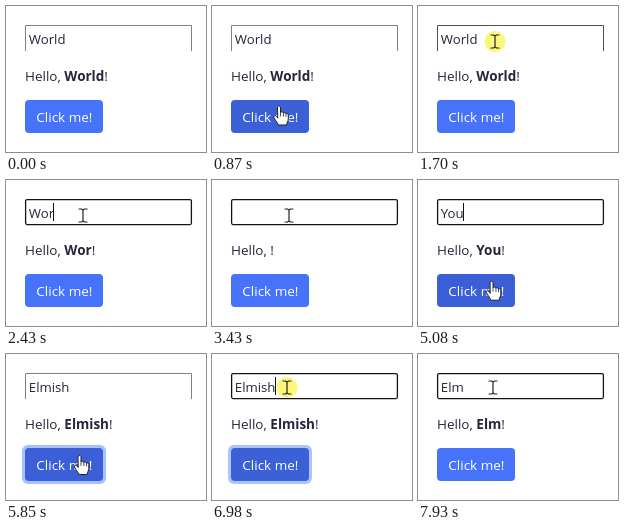
Recreate the animation shown at these times as an HTML page. Size 200 px wide and 146 px high, loop 8 s.

```html
<!DOCTYPE html>
<html lang="en">
<head>
<meta charset="utf-8">
<title>Greeting form</title>
<style>
  html, body { margin: 0; width: 100%; height: 100%; overflow: hidden; background: #fff; }
  svg { display: block; width: 200px; height: 146px; }
  text { font: 13.5px "Open Sans", "Noto Sans", sans-serif; fill: #25263a; white-space: pre; }
  #value { font-size: 13.2px; }
  .bold { font-weight: 700; }
  .label { fill: #fff; }
  .cursor { stroke: #222; stroke-linejoin: round; stroke-linecap: round; }
</style>
</head>
<body>
<svg viewBox="0 0 200 146">
  <path id="plain" d="M19.5 45V19.5H185.5V45" fill="none"/>
  <rect id="focus" x="19.6" y="19.6" width="165.8" height="25" rx="1.5" fill="none" stroke="#141414" stroke-width="1.3"/>
  <text id="hello" x="19" y="75">Hello, <tspan id="name" class="bold"></tspan>!</text>
  <rect id="ring" x="16" y="91" width="84" height="39" rx="6" fill="#a9c0fc"/>
  <rect id="button" x="19" y="94" width="78" height="33" rx="4"/>
  <circle id="glow" r="10.5" fill="#fbf77a"/>
  <text id="value" x="22.8" y="38"></text>
  <rect id="caret" y="23" width="1" height="18" fill="#111"/>
  <text class="label" x="30.3" y="116">Click me!</text>
  <path id="beam" class="cursor" fill="none" stroke-width="1.2"
    d="M-4 -6.5H-1.5L0 -5.5L1.5 -6.5H4M0 -5.5V5.5M-4 6.5H-1.5L0 5.5L1.5 6.5H4"/>
  <path id="arrow" class="cursor" fill="#fff" d="M0 0V14.5L3.4 11.4L5.7 16.6L8 15.6L5.7 10.6H10.3Z"/>
  <g id="hand" class="cursor" fill="#fff">
    <path d="M-1.5 1.3C-1.5 -.5 1.5 -.5 1.5 1.3V6.5C2 5.4 4.3 5.6 4.4 7C5 6.1 6.9 6.4 7 7.8C7.7 7 9.3 7.5 9.3 9V13C9.3 15.2 7.8 16.4 7.6 19H-.8C-1.2 16.7 -3.5 14.7 -5 11.5C-5.7 9.7 -3.8 8.9 -2.8 10.2L-1.5 11.8Z"/>
    <path d="M1.5 6.5V10M4.4 7.2V10.2M7 8V10.5" stroke-width=".8"/>
  </g>
</svg>
<script>
const LOOP = 8000, BLINK = 530, FADE = 130;
const $ = id => document.getElementById(id);
const show = (id, on) => { $(id).style.opacity = +on; };
const clamp = v => Math.max(0, Math.min(1, v));
const last = (list, test) => list.filter(test).pop();

// number of keystrokes made by time t
const keys = (t, start, gap) => Math.max(0, Math.floor((t - start) / gap) + 1);
const erase = (word, n) => word.slice(0, Math.max(0, word.length - n));

function wordAt(t) {
  if (t < 3500) return erase("World", keys(t, 2230, 152));
  if (t < 5780) return "You".slice(0, keys(t, 3500, 200));
  return erase("Elmish", keys(t, 7450, 240));
}

// each move glides from the previous resting place to [x, y]
const moves = [
  { start: 310, end: 870, to: [67, 100] },
  { start: 930, end: 1630, to: [77, 35.5] },
  { start: 4580, end: 5180, to: [73.5, 101.5] },
  { start: 6310, end: 6960, to: [75, 33.5] }
];
let rest = [72, 146];
for (const m of moves) {
  m.from = rest;
  rest = m.to;
}

function pointer(t) {
  const m = last(moves, m => m.start <= t);
  if (!m) return null;
  const k = 1 - (1 - clamp((t - m.start) / (m.end - m.start))) ** 3;
  return m.from.map((v, i) => v + (m.to[i] - v) * k);
}

const clicks = [1630, 5630, 6900];
const focusTimes = [1770, 6930], blurTime = 5630;
const caretStarts = [1770, 2380, 2900, 3500, 3900, 6930];

// linear fade in at a and out at b
const fade = (t, a, b) => Math.min(clamp((t - a) / FADE), clamp(1 - (t - b) / FADE));
const mix = (a, b, k) => `rgb(${a.map((v, i) => Math.round(v + (b[i] - v) * k))})`;

function cursorKind(p) {
  if (!p) return "";
  const y = p[1];
  if (y >= 94 && y < 127) return "hand";
  return y < 46 || (y >= 59 && y < 80) ? "beam" : "arrow";
}

function draw(t) {
  const word = wordAt(t);
  if ($("value").textContent !== word) {
    $("value").textContent = $("name").textContent = word;
  }
  const focus = t >= focusTimes[1] || (t >= focusTimes[0] && t < blurTime);
  const p = pointer(t);
  const kind = cursorKind(p);

  show("focus", focus);
  show("plain", !focus);
  $("plain").setAttribute("stroke", p && p[1] < 46 ? "#505050" : "#808080");

  const dark = Math.max(fade(t, 400, 975), fade(t, 4885, 6975));
  $("button").setAttribute("fill", mix([71, 115, 251], [58, 95, 214], dark));
  show("ring", fade(t, blurTime, 6975));

  const blink = last(caretStarts, s => s <= t);
  show("caret", focus && (t - blink) % (2 * BLINK) < BLINK);
  const width = word ? $("value").getComputedTextLength() : 0;
  $("caret").setAttribute("x", Math.round(22 + width));

  for (const id of ["beam", "arrow", "hand", "glow"]) {
    show(id, id === kind);
    if (p) $(id).setAttribute("transform", `translate(${p})`);
  }
  show("glow", clicks.some(c => t >= c && t < c + 215));
}

const start = performance.now();
function tick() {
  draw((performance.now() - start) % LOOP);
  requestAnimationFrame(tick);
}
tick();
</script>
</body>
</html>
```
